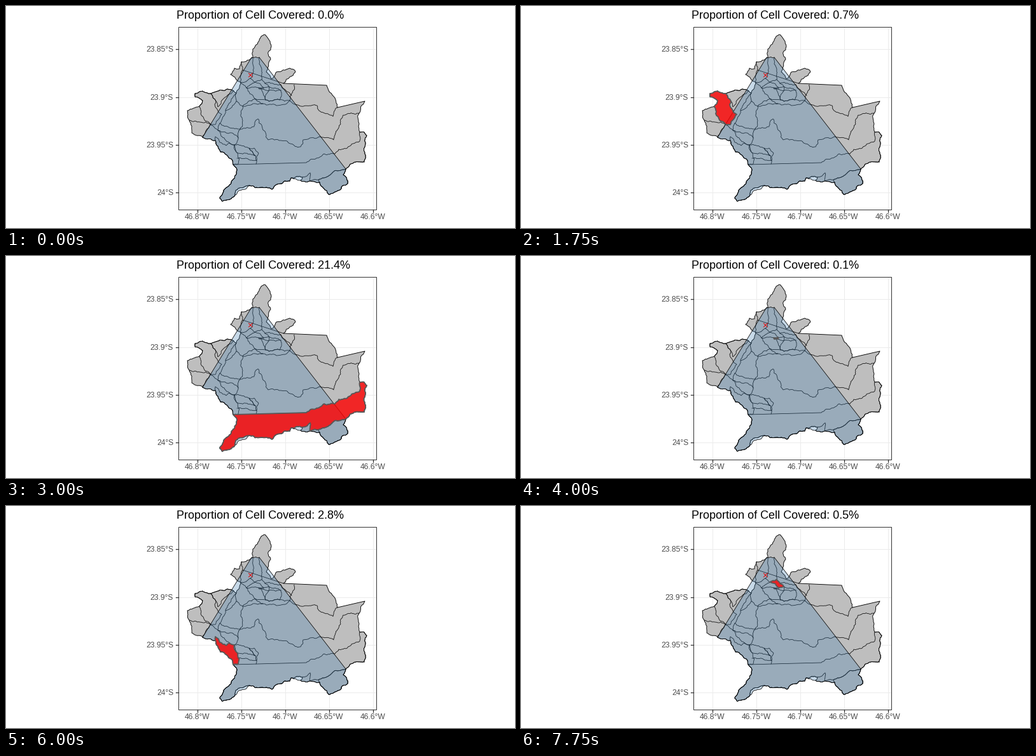
A matplotlib script that plays this animation: 800 by 350 pixels, repeating every 8 s.

```python
import math
import random

import matplotlib.pyplot as plt
from matplotlib.animation import FuncAnimation
from matplotlib.patches import Polygon, Rectangle

W, H, DPI = 800, 350, 100
STEP = 250
PX = 72 / DPI
STRAIGHT = 40  # longer borders run straight, shorter ones meander

plt.rcParams["font.family"] = "Liberation Sans"

# Outer boundary, clockwise, in stage pixels
NORTH = [(388, 81), (388, 68), (397, 56), (407, 45), (417, 64), (412, 73),
         (416, 84), (409, 104), (417, 115), (425, 104), (446, 98), (455, 104),
         (446, 112), (436, 122)]
EAST = [(436, 122), (504, 125), (521, 160), (564, 150), (555, 169), (556, 199),
        (563, 199), (567, 204), (564, 222), (563, 246), (550, 246), (534, 257)]
SOUTH = [(534, 257), (530, 266), (537, 280), (507, 297), (493, 278), (463, 275),
         (466, 270), (448, 271), (446, 276), (418, 289), (383, 283), (361, 291),
         (360, 298), (340, 308), (336, 303), (350, 284), (363, 258), (357, 250),
         (347, 235), (337, 230), (329, 212), (309, 207)]
WEST = [(309, 207), (292, 200), (288, 180), (285, 165), (304, 158), (309, 149),
        (297, 143), (297, 138), (309, 134), (322, 138), (333, 134), (358, 134),
        (362, 137), (369, 121), (353, 108), (359, 98), (367, 99), (370, 88),
        (388, 81)]
INLETS = SOUTH[6], SOUTH[11]  # water inside the cell

PLATEAU = [(357, 250), (472, 247), (500, 233), (517, 233), (523, 226),
           (556, 213), (556, 199)]
BAY = [(516, 260), (491, 274), (478, 276), (478, 263)]

REGIONS = {
    "coast": PLATEAU + EAST[5:] + BAY + SOUTH[6:18],
    "cape": SOUTH[:5] + BAY[1::-1],
    "west": WEST[4:10] + [(330, 150), (328, 155), (339, 171), (329, 187),
                          (322, 187), (306, 170)],
    "ridge": SOUTH[17:21] + [(329, 206), (346, 220), (351, 216), (359, 219),
                             (365, 249)],
    "chip": [(397, 129), (404, 128), (404, 131), (398, 131)],
    "creek": [(382, 224), (390, 224), (397, 232), (394, 244), (392, 236),
              (387, 229)],
    "core": [(391, 120), (402, 116), (407, 122), (413, 127), (406, 129),
             (400, 123)],
    "notch": WEST[9:12] + [(340, 148), (333, 159), (330, 150)],
    "upland": [(369, 121), (384, 114), (391, 120), (378, 129)],
    "mill": [(413, 127), (432, 133), (430, 148), (408, 148)],
    "vale": [(391, 146), (408, 148), (430, 148), (446, 149), (425, 157),
             (404, 154)],
    "hill": [(362, 150), (372, 158), (368, 194), (336, 185), (345, 165)],
    "bend": [(333, 196), (355, 200), (365, 208), (359, 219), (338, 205)],
    "basin": [(359, 219), (382, 224), (387, 229), (392, 236), (365, 232)],
}

BORDERS = [
    [(372, 101), (436, 122)],
    [(370, 88), (372, 101), (369, 121)],
    [(388, 81), (389, 104), (384, 114)],
    [(398, 81), (402, 101), (402, 116)],
    [(407, 122), (432, 124), (449, 141)],
    [(378, 129), (400, 130), (432, 133)],
    [(378, 129), (391, 146), (372, 158), (404, 154)],
    [(400, 130), (408, 148)],
    [(345, 165), (362, 137), (362, 150)],
    [(368, 194), (390, 190), (396, 178), (408, 200), (412, 211), (432, 212),
     (463, 222), (467, 211), (493, 206)],
    [(309, 207), (322, 187), (333, 196), (336, 185)],
    [(288, 180), (322, 187)],
    [(365, 208), (368, 194)],
    [(363, 240), (394, 244), (393, 249)],
    [(453, 124), (446, 149), (458, 156), (489, 157), (492, 165), (514, 174),
     (521, 160)],
    [(555, 169), (530, 172), (526, 186), (515, 211), (493, 206)],
]

CELL = [(386, 81), (398, 81)] + [p for p in SOUTH if p not in INLETS]

# Share of the cell per region, and the order in which regions light up
SHARES = dict(none=0.0, coast=21.4, cape=2.9, west=0.7, ridge=2.8, chip=0.1,
              creek=0.1, core=0.5, notch=0.1, upland=0.4, mill=1.0, vale=0.9,
              hill=3.6, bend=1.1, basin=0.9)
ORDER = """none upland chip vale notch core bend west
           mill basin none creek coast upland cape vale
           chip hill bend creek none mill notch basin
           ridge upland vale none hill chip bend core""".split()


def meander(a, b, rng):
    """Midpoint displacement from a up to b."""
    length = math.dist(a, b)
    if length < 3:
        return [a]
    d = rng.uniform(-0.16, 0.16) * min(length, 16) / length
    mid = ((a[0] + b[0]) / 2 + d * (a[1] - b[1]),
           (a[1] + b[1]) / 2 + d * (b[0] - a[0]))
    return meander(a, mid, rng) + meander(mid, b, rng)


def wiggle(p, q):
    """Points from p up to q; the same path in both directions."""
    a, b = sorted((p, q))
    if math.dist(a, b) > STRAIGHT:
        return [p]
    rng = random.Random(f"{a}{b}")
    pts = meander(a, b, rng)
    return pts if a == p else [b] + pts[:0:-1]


def rough(points, closed=False):
    ends = points[1:] + points[:1] if closed else points[1:]
    out = [pt for p, q in zip(points, ends) for pt in wiggle(p, q)]
    return out if closed else out + [points[-1]]


fig = plt.figure(figsize=(W / DPI, H / DPI), dpi=DPI, facecolor="white")
ax = fig.add_axes([0, 0, 1, 1])
ax.set_xlim(0, W)
ax.set_ylim(H, 0)
ax.axis("off")


def line(points, color, width, **kw):
    xs, ys = zip(*points)
    ax.plot(xs, ys, color=color, lw=width * PX, **kw)


def shape(points, fill, edge, width, z):
    patch = Polygon(points, closed=True, facecolor=fill, edgecolor=edge,
                    lw=width * PX, zorder=z, joinstyle="round")
    ax.add_patch(patch)
    return patch


LEFT, TOP, RIGHT, BOTTOM = 270.5, 32.5, 581.5, 320.5
AXIS_TEXT = dict(fontsize=12 * PX, color="#4d4d4d", va="baseline")

for i, label in enumerate(("46.8", "46.75", "46.7", "46.65", "46.6")):
    x = 300.5 + 69 * i
    line([(x, TOP), (x, BOTTOM)], "#ebebeb", 1, zorder=1)
    line([(x, BOTTOM), (x, BOTTOM + 4)], "#333333", 1.3, zorder=1)
    ax.text(x, 336, label + "°W", ha="center", **AXIS_TEXT)

for i, label in enumerate(("23.85", "23.9", "23.95", "24")):
    y = 68.2 + 75.4 * i
    line([(LEFT, y), (RIGHT, y)], "#ebebeb", 1, zorder=1)
    line([(LEFT - 4, y), (LEFT, y)], "#333333", 1.3, zorder=1)
    ax.text(263, y + 4, label + "°S", ha="right", **AXIS_TEXT)

ax.add_patch(Rectangle((LEFT, TOP), RIGHT - LEFT, BOTTOM - TOP, fill=False,
                       edgecolor="#333333", lw=PX, zorder=8))

shape(rough(NORTH + EAST + SOUTH + WEST, True), "#bebebe", "black", 0.9, 2)
for ring in REGIONS.values():
    shape(rough(ring, True), "none", "black", 0.75, 3)
for border in BORDERS:
    line(rough(border), "black", 0.75, zorder=3)
shape(rough(CELL, True), (70 / 255, 130 / 255, 180 / 255, 0.3), "black", 0.75, 4)

glow = shape(REGIONS["core"], (1, 0, 0, 0.8), "#595959", 1.8, 5)
for s in (-2.8, 2.8):
    line([(381.5, 109 - s), (387.1, 109 + s)], "#e01010", 1.1, zorder=6)

title = ax.text(268.5, 20, "", fontsize=18 * PX, color="black",
                ha="left", va="baseline")


def draw(i):
    name = ORDER[i]
    title.set_text(f"Proportion of Cell Covered: {SHARES[name]:.1f}%")
    glow.set_visible(name in REGIONS)
    if name in REGIONS:
        glow.set_xy(rough(REGIONS[name], True))
    return glow, title


anim = FuncAnimation(fig, draw, frames=len(ORDER), interval=STEP,
                     repeat=True, repeat_delay=0)
plt.show()
```
